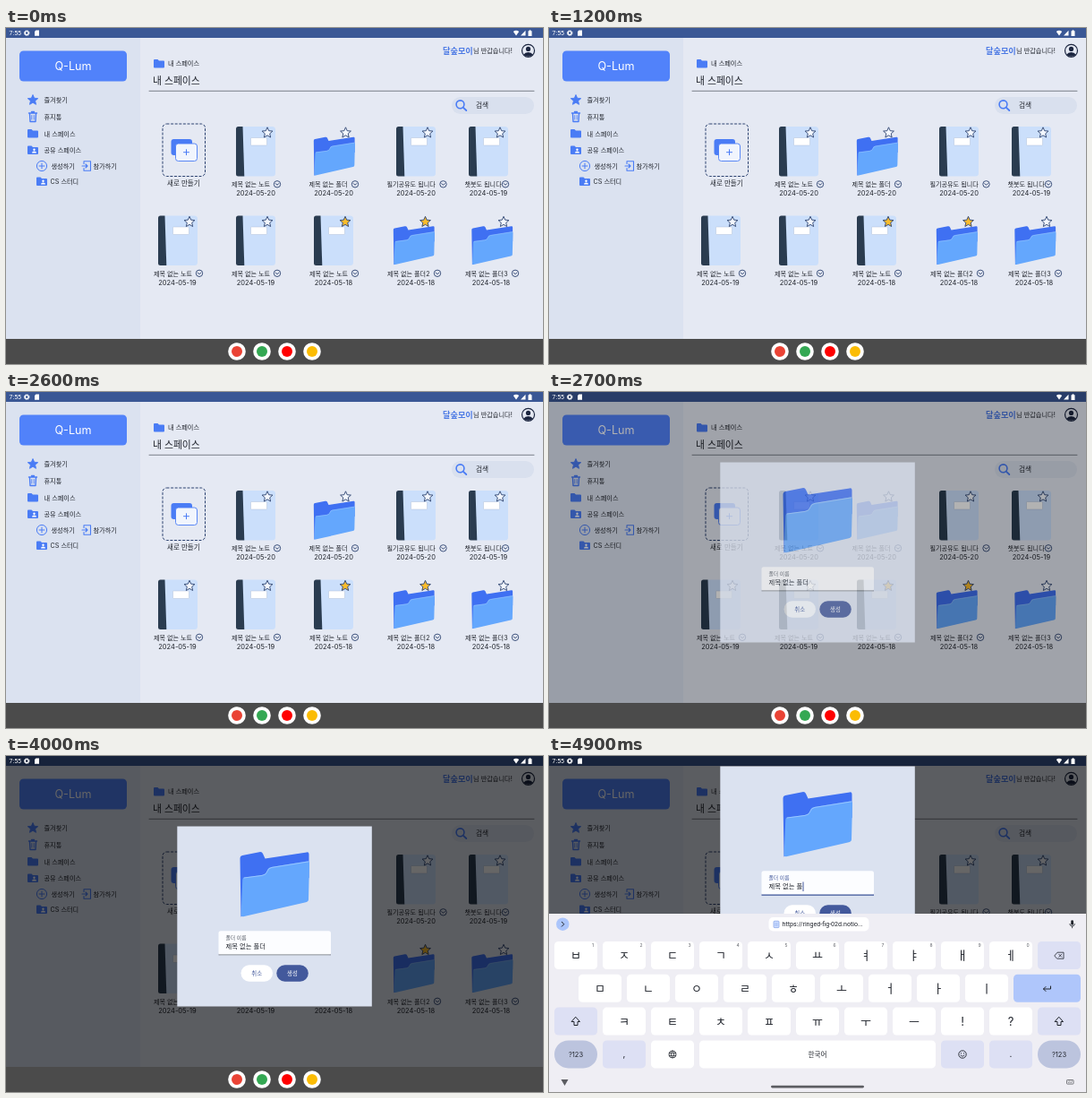
An HTML page that plays this animation: 600x375 px, repeating every 5 s.

```html
<!DOCTYPE html>
<html lang="ko">
<head>
<meta charset="utf-8">
<style>
html, body { margin: 0; width: 100%; height: 100%; overflow: hidden; background: #e5e9f3; }
svg { display: block; width: 100vw; height: 100vh; font-family: Inter, "Noto Sans CJK KR", "Noto Sans CJK", sans-serif; }
.roboto { font-family: Roboto, "Noto Sans CJK KR", "Noto Sans CJK", sans-serif; }
</style>
</head>
<body>
<svg id="stage" viewBox="0 0 600 375"></svg>
<script>
const BLUE = '#4a7cf5', NAVY = '#2c4270', INK = '#20242c', ACCENT = '#43599c', PALE = '#dde0f4';

const text = (x, y, size, s, fill = INK, more = '') =>
  `<text x="${x}" y="${y}" font-size="${size}" fill="${fill}" ${more}>${s}</text>`;
const mid = (x, y, size, s, fill, more = '') => text(x, y, size, s, fill, 'text-anchor="middle" ' + more);
const rect = (x, y, w, h, r, fill, more = '') =>
  `<rect x="${x}" y="${y}" width="${w}" height="${h}" rx="${r}" fill="${fill}" ${more}/>`;
const circle = (x, y, r, fill, more = '') => `<circle cx="${x}" cy="${y}" r="${r}" fill="${fill}" ${more}/>`;
const path = (d, fill, more = '') => `<path d="${d}" fill="${fill}" ${more}/>`;
const line = (d, color, w = 1, more = '') =>
  path(d, 'none', `stroke="${color}" stroke-width="${w}" stroke-linecap="round" stroke-linejoin="round" ${more}`);
const group = (id, s) => `<g id="${id}">${s}</g>`;
const at = (x, y, s, k = 1) => `<g transform="translate(${x} ${y}) scale(${k})">${s}</g>`;

function star(x, y, r, fill, stroke) {
  const pts = [...Array(10)].map((_, i) => {
    const a = i * Math.PI / 5, q = i % 2 ? r * 0.46 : r;
    return (x + q * Math.sin(a)).toFixed(2) + ',' + (y - q * Math.cos(a)).toFixed(2);
  });
  return `<polygon points="${pts.join(' ')}" fill="${fill}" stroke="${stroke}" stroke-width=".9" stroke-linejoin="round"/>`;
}

// Small interface icons
const miniFolder = (x, y) => path(`M${x} ${y + 1}q0-1 1-1h3.5l1.5 1.5h5q1 0 1 1v6q0 1-1 1h-10q-1 0-1-1z`, BLUE);
const sharedFolder = (x, y) => miniFolder(x, y) + circle(x + 7.5, y + 4.2, 1.2, '#fff') +
  path(`M${x + 5} ${y + 8}q0-2 2.5-2t2.5 2z`, '#fff');
const chevron = (x, y) => circle(x, y, 3.7, 'none', `stroke="${NAVY}" stroke-width=".9"`) +
  line(`M${x - 1.7} ${y - .7}l1.7 1.7 1.7-1.7`, NAVY, 1);

const bigFolder =
  path('M.5 8Q.5 5.5 3 5L22 1.2Q25 .6 26 3L28.5 8.5 75 1.4Q77.5 1 77.5 3.5V30L1.5 73.5Z', '#3f70f2') +
  path('M5.5 29.5L25 27Q29.5 26.3 30.5 22.5 31.5 18.6 35.5 18L75.5 11.6Q78 11.3 78 13.5L77 54Q77 56.6 74 57.2L4 73.2Q1.5 73.6 1.6 71L3.3 32Q3.5 29.8 5.5 29.5Z', '#64a7fd') +
  line('M5 30L25 27.4Q30 26.6 31 22.6 32 19 36 18.4L77 11.9', '#9fcaff', .9);

const notebook = (x, y) =>
  rect(x + 5, y, 39, 55.5, 3.5, '#cbdffb') +
  path(`M${x + 2.5} ${y}H${x + 7.5}L${x + 9.3} ${y + 55.5}H${x + 2.5}Q${x} ${y + 55.5} ${x} ${y + 53}V${y + 2.5}Q${x} ${y} ${x + 2.5} ${y}Z`, '#2a3c50') +
  rect(x + 16.5, y + 12.5, 18, 8.5, .6, '#fff', 'stroke="#aebfd8" stroke-width=".5"');

// One shelf item; row 1 sits 99.5 px lower than row 0
function item(row, x, kind, label, labelX, iconX, date, dateX, fav) {
  const y = row * 99.5;
  const art = kind === 'note'
    ? notebook(x, 110 + y) + star(x + 35, 117 + y, 6.2, fav ? '#fbbc2c' : '#f3f7fe', NAVY)
    : at(x, 121 + y, bigFolder, .595) + star(x + 36, 117 + y, 6.2, fav ? '#fbbc2c' : '#f3f7fe', NAVY);
  return art + text(labelX, 177 + y, 7.1, label) + chevron(iconX, 174.3 + y) + mid(dateX, 187 + y, 7.5, date);
}

const NOTE = '제목 없는 노트', DIR = '제목 없는 폴더';
const items = [
  [0, 257, 'note', NOTE, 252, 303, '2024-05-20', 279],
  [0, 343.5, 'dir', DIR, 338.5, 390, '2024-05-20', 366],
  [0, 436, 'note', '필기공유도 됩니다', 425.5, 488.5, '2024-05-20', 458],
  [0, 517, 'note', '챗봇도 됩니다', 512.5, 558, '2024-05-19', 539],
  [1, 170, 'note', NOTE, 165, 216, '2024-05-19', 191.5],
  [1, 257, 'note', NOTE, 252, 303, '2024-05-19', 279],
  [1, 344, 'note', NOTE, 339, 390, '2024-05-18', 366, true],
  [1, 432.5, 'dir', DIR + '2', 426, 482, '2024-05-18', 458, true],
  [1, 520, 'dir', DIR + '3', 513, 569, '2024-05-18', 542]
].map(a => item(...a)).join('');

const sidebar = rect(0, 11, 150, 364, 0, '#dbe2f0') +
  rect(15, 25.5, 120, 34, 4.5, '#5182fa') + mid(75, 47.4, 12.6, 'Q-Lum', '#fff') +
  star(30, 80.5, 6, BLUE, BLUE) + text(42.5, 83, 7.2, '즐겨찾기') +
  line('M25.5 95H34.5M28.5 93.5H31.5M26.5 95.5L27 104.5H33L33.5 95.5', BLUE, 1.4) +
  line('M28.8 97.5V102M31.2 97.5V102', BLUE, .9) + text(42.5, 102, 7.2, '휴지통') +
  miniFolder(24, 113) + text(42.5, 120.5, 7.2, '내 스페이스') +
  sharedFolder(24, 131.5) + text(42.5, 139, 7.2, '공유 스페이스') +
  circle(40, 154, 5.6, 'none', `stroke="${BLUE}"`) + line('M37 154H43M40 151V157', BLUE) + text(50.5, 156.8, 7.2, '생성하기') +
  line('M87 151.5V148.8H94.5V159.2H87V156.5M85 154H91M89 152L91 154 89 156', BLUE, 1.1) + text(97.5, 156.8, 7.2, '참가하기') +
  sharedFolder(34, 166.5) + text(49.5, 174, 7.2, 'CS 스터디');

const header = miniFolder(165, 35) + text(181, 42.3, 7.2, '내 스페이스') +
  text(164, 63, 10.8, '내 스페이스') + line('M160 70.3H590', '#6f747f', .9) +
  text(488, 29, 9.2, '달숲모이', '#4a78e4', 'font-weight="700"') + text(522, 28, 7.2, '님 반갑습니다!') +
  circle(583.5, 25.3, 7, '#e5e9f3', 'stroke="#1c2640" stroke-width="1.2"') + circle(583.5, 23.4, 2.6, '#1c2640') +
  path('M578.5 29.5Q580 27 583.5 27T588.5 29.5Q586.5 31.8 583.5 31.8T578.5 29.5Z', '#1c2640') +
  rect(498, 77, 92, 19, 9.5, '#d9e0ee') +
  circle(507.5, 85.3, 4.4, 'none', `stroke="${BLUE}" stroke-width="1.6"`) + line('M511 88.8L514.3 92', BLUE, 1.8) +
  text(525, 89.3, 7.7, '검색');

const newCard = rect(175, 107, 47.5, 58.5, 4.5, 'none', `stroke="${NAVY}" stroke-width="1" stroke-dasharray="3 1.6"`) +
  rect(184.5, 124, 23.5, 18, 3, BLUE) +
  rect(189.5, 129, 24, 19.5, 3, '#f1f5fd', `stroke="${BLUE}" stroke-width=".9"`) +
  line('M198.5 138.7H204.5M201.5 135.7V141.7', BLUE, 1) + text(180, 176, 7.5, '새로 만들기');

const popup = rect(213.5, 141, 46.5, 46.5, 5, '#bcc7da') + text(222, 158, 7.4, '폴더 생성') +
  line('M218 163.7H256', '#77829a', .8) + text(222, 176.3, 7.4, '노트 생성');

const statusIcons = text(3.5, 8.3, 7, '7:55', '#fff', 'class="roboto"') +
  circle(23.2, 5.6, 2, 'none', 'stroke="#fff" stroke-width="1.4"') +
  circle(23.2, 5.6, 2.9, 'none', 'stroke="#fff" stroke-width=".9" stroke-dasharray="1.2 1.08"') +
  path('M33.5 2.5H37V8.8H32V4Z', '#fff') +
  path('M566.8 4Q570 1.4 573.2 4L570 8.5Z', '#fff') + path('M575 8.5H580.5V2.8Z', '#fff') +
  path('M583.5 3.2H584.7V2.3H586.3V3.2H587.5V9H583.5Z', '#fff');

const dialog = rect(191.3, 78.5, 217.5, 201, 0, '#dbe2f0') + at(261, 106, bigFolder) +
  rect(237.5, 195.2, 125.5, 27, 2.5, '#fcfdff') + rect(237.5, 221.5, 125.5, .8, 0, '#6b6f77', 'id="under"') +
  text(245.5, 205.3, 5.8, '폴더 이름', '#555a64', 'id="label"') + text(245.5, 215.2, 7.3, DIR, INK, 'id="value"') +
  rect(262.5, 233.3, 35.5, 18.5, 9.25, '#fff') + mid(280.2, 245, 6.4, '취소', ACCENT) +
  rect(302.3, 233.3, 35.5, 18.5, 9.25, ACCENT) + mid(320, 245, 6.4, '생성', '#fff') +
  rect(290.3, 207.5, 1, 10.5, 0, ACCENT, 'id="caret"') +
  group('handle', path('M291 224.5L294.2 227.6A4.5 4.5 0 1 1 287.8 227.6Z', ACCENT));

const dock = rect(0, 347, 600, 28, 0, '#4b4b4b') +
  ['#ea4335', '#34a853', '#ff0000', '#fbbc04'].map((c, i) =>
    circle(258 + 28 * i, 361, 9.8, '#fff') + circle(258 + 28 * i, 361, 6, c)).join('');

// Keyboard
const rowY = r => 207 + 36.8 * r;
const key = (r, x, w, fill = '#fff', round = 4.5) => rect(x, rowY(r), w, 31, round, fill);
const letters = (r, x0, s) => [...s].map((c, i) =>
  key(r, x0 + 54 * i, 48) + mid(x0 + 54 * i + 24, rowY(r) + 20.3, 13, c)).join('');
const shift = x => key(2, x, 48, PALE) + line(`M${x + 24} 291.5L${x + 28.5} 296.5H${x + 26}V300.5H${x + 22}V296.5H${x + 19.5}Z`, INK, 1);
const wide = x => key(3, x, 48, '#bcc4de', 15.5) + mid(x + 24, 335.5, 7.5, '?123');

const keyboard = rect(0, 176, 600, 199, 0, '#efeef4') +
  circle(15.3, 187.7, 7.2, '#abc5fb') + line('M14.3 185.2L16.8 187.7 14.3 190.2', INK, 1) +
  group('grip', line('M288 188H321', '#9a9ca3', .7)) +
  group('chip', rect(245.5, 180, 112, 15.5, 5, '#fff') +
    rect(251, 184.2, 6, 7.4, 1, '#cbdcff', 'stroke="#7f9fe6" stroke-width=".7"') + line('M252.8 187H255.2M252.8 189H255.2', '#7f9fe6', .6) +
    text(260.5, 190.3, 7.1, 'https://ringed-fig-02d.notio...', INK, 'class="roboto"')) +
  rect(583.2, 183.3, 2.8, 5.4, 1.4, INK) + line('M581.8 187.4Q582 190 584.6 190T587.4 187.4M584.6 190V191.8', INK, .8) +
  letters(0, 6, 'ㅂㅈㄷㄱㅅㅛㅕㅑㅐㅔ') +
  [...'1234567890'].map((c, i) => mid(49 + 54 * i, 213.2, 5, c, '#5c5f66')).join('') +
  key(0, 546, 48, PALE) + line('M565 222.7L568 219.2H575V226.2H568ZM569.7 221.2L572.7 224.2M572.7 221.2L569.7 224.2', INK, .8) +
  letters(1, 33, 'ㅁㄴㅇㄹㅎㅗㅓㅏㅣ') +
  key(1, 519, 75, '#afc6fb') + line('M560.5 257V260H552.5M555 257.5L552.5 260 555 262.5', INK, 1) +
  shift(6) + letters(2, 60, 'ㅋㅌㅊㅍㅠㅜㅡ!?') + shift(546) +
  wide(6) + key(3, 60, 48, PALE) + mid(84, 336, 10, ',') +
  key(3, 114, 48) + circle(138, 333, 4, 'none', `stroke="${INK}" stroke-width=".8"`) +
  line('M134.2 331.6H141.8M134.2 334.4H141.8M138 329Q134.6 333 138 337Q141.4 333 138 329', INK, .7) +
  key(3, 168, 264) + mid(300, 335.7, 7.6, '한국어') +
  key(3, 438, 48, PALE) + circle(462, 333, 4.2, 'none', `stroke="${INK}" stroke-width=".9"`) +
  circle(460.5, 331.8, .6, INK) + circle(463.5, 331.8, .6, INK) + line('M460 334.2Q462 336.6 464 334.2', INK, .8) +
  key(3, 492, 48, PALE) + mid(516, 336, 10, '.') + wide(546);

const navIcons = path('M13.5 361H21.5L17.5 368Z', 'currentColor') +
  rect(248, 367.7, 104, 2.8, 1.4, 'currentColor') +
  rect(578.5, 361.5, 7.5, 4.6, .7, 'none', 'stroke="currentColor" stroke-width=".8"') +
  line('M580 363H584.6M580.4 364.6H584.2', 'currentColor', .7, 'stroke-dasharray=".2 1.3"');

stage.innerHTML =
  rect(0, 0, 600, 375, 0, '#e5e9f3') + sidebar + header + newCard + items +
  rect(0, 0, 600, 11, 0, '#3a5795') +
  group('menu', popup) +
  rect(0, 0, 600, 375, 0, '#000', 'id="scrim"') + group('modal', dialog) + statusIcons +
  group('dock', dock) + group('keys', keyboard) +
  group('nav', rect(0, 347, 600, 28, 0, '#1c1c1e', 'id="navBg"') + navIcons);

const $ = id => document.getElementById(id);
const set = (id, name, value) => $(id).setAttribute(name, value);
const show = (id, on) => set(id, 'visibility', on ? 'inherit' : 'hidden');
const ramp = (t, from, len) => Math.min(1, Math.max(0, (t - from) / len));

function draw(t) {
  show('menu', t >= 1400 && t < 2500);

  const fade = ramp(t, 2600, 200);
  set('scrim', 'opacity', 0.6 * fade);
  set('modal', 'opacity', 1 - (1 - fade) ** 2);

  const focus = t >= 4100, typed = t >= 4800;
  set('label', 'fill', focus ? ACCENT : '#555a64');
  set('under', 'fill', focus ? ACCENT : '#6b6f77');
  set('under', 'height', focus ? 1.3 : 0.8);
  $('value').textContent = typed ? DIR.slice(0, -1) : DIR;
  set('caret', 'x', typed ? 283.5 : 290.3);
  show('caret', focus);
  show('handle', focus && !typed);

  const u = ramp(t, 4200, 215), rise = u * u * (3 - 2 * u);
  set('modal', 'transform', `translate(0 ${-67 * (1 - (1 - u) ** 1.38)})`);
  set('keys', 'transform', `translate(0 ${199 * (1 - rise)})`);
  set('keys', 'opacity', rise);
  show('chip', t >= 4500);
  show('grip', t < 4500);

  show('dock', t < 4200);
  show('nav', t >= 4200);
  set('navBg', 'opacity', t < 4400 ? 0.65 : 0);
  set('nav', 'color', t < 4400 ? '#fff' : '#5c5d62');
}

const start = performance.now();
function tick() {
  draw(Math.floor((performance.now() - start) % 5000 / 100) * 100);
  requestAnimationFrame(tick);
}
tick();
</script>
</body>
</html>
```
